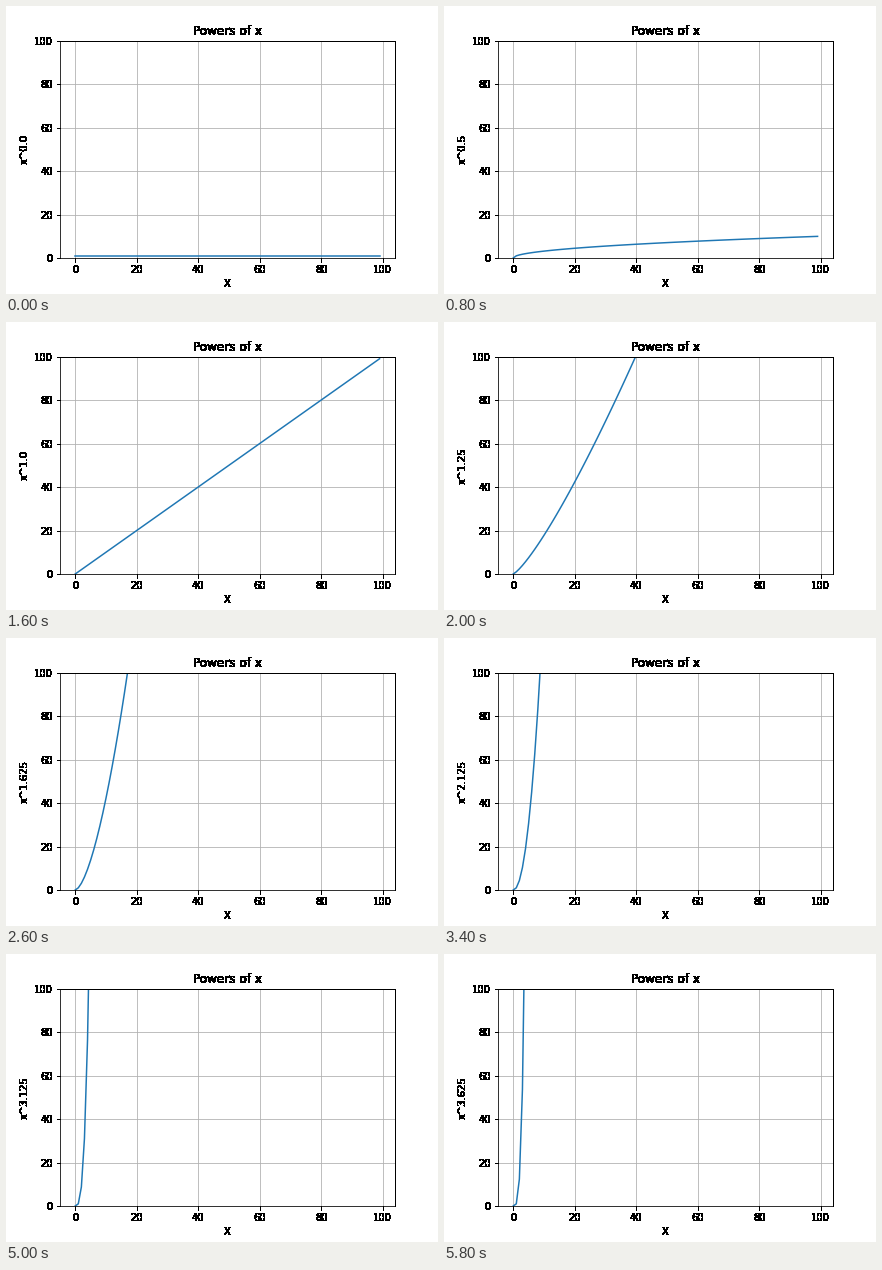
These frames come from a looping animation (432 by 288 pixels, 6 s). A matplotlib script:

```python
import matplotlib.pyplot as plt
import numpy as np
from matplotlib.animation import FuncAnimation
from matplotlib.text import Text

FRAMES = 30
STEP = 0.125

plt.rcParams["font.family"] = "DejaVu Sans"


def harden(image, dpi):
    """Make every touched pixel opaque, for heavy text without soft edges."""
    solid = image.copy()
    solid[..., 3] = image[..., 3] > 0
    return solid, 0, 0


fig, ax = plt.subplots(figsize=(6, 4), dpi=72, facecolor="white")
fig.subplots_adjust(left=0.125, right=0.9, bottom=0.125, top=0.88)

x = np.arange(100.0)
curve, = ax.plot(x, x ** 0, color="#1f77b4", lw=1.5)

ax.set(title="Powers of x", xlabel="X", xlim=(-4.95, 103.95), ylim=(0, 100),
       xticks=range(0, 101, 20), yticks=range(0, 101, 20))
ylabel = ax.set_ylabel("x^0.0")
ax.grid(True)

tick_marks = ax.get_xticklines() + ax.get_yticklines()
edges = [ax.spines["top"], ax.spines["right"]]
for artist in fig.findobj(Text) + tick_marks + edges:
    artist.set_agg_filter(harden)


def update(i):
    power = i * STEP
    curve.set_ydata(x ** power)
    ylabel.set_text(f"x^{power}")
    return curve, ylabel


anim = FuncAnimation(fig, update, frames=FRAMES, interval=200,
                     repeat=True, repeat_delay=0, blit=False)
plt.show()
```
